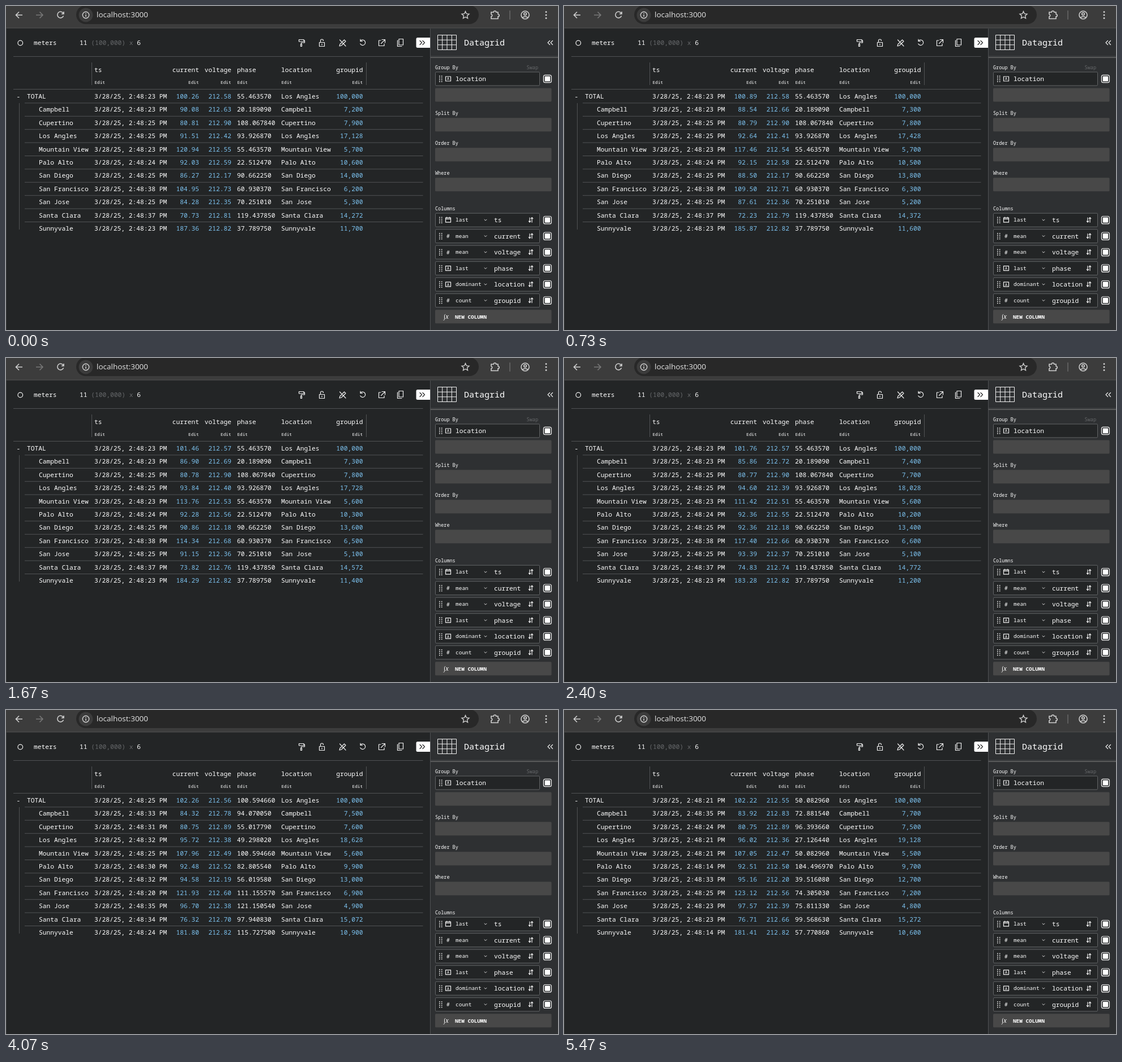
Animation of 975 by 574 pixels, one loop 5.54 s. Source, as an HTML page:

```html
<!DOCTYPE html>
<html lang="en">
<head>
<meta charset="utf-8">
<title>Streaming data grid</title>
<style>
html, body { margin: 0; width: 100%; height: 100%; overflow: hidden; background: #232526; }
svg { display: block; width: 975px; height: 574px; }
text { font-family: "Noto Sans Mono", "DejaVu Sans Mono", monospace; font-size: 11.25px; fill: #fff; white-space: pre; }
.num { fill: #7dc3f0; text-anchor: end; }
.end { text-anchor: end; }
.tiny { font-size: 7.7px; }
.label { font-size: 8.5px; font-weight: 500; }
.agg { font-size: 9.5px; font-weight: 500; }
.name { font-weight: 500; }
.dim { fill: #66686a; }
.url { font: 13.5px "Open Sans", "Noto Sans", sans-serif; fill: #e6e6e6; }
.ico { fill: none; stroke: #f0f0f0; stroke-width: 1.2; stroke-linecap: round; stroke-linejoin: round; }
.thin { stroke-width: .9; }
.bar { fill: none; stroke: #d0d0d0; stroke-width: 1.6; }
.rule { stroke: #505254; fill: none; }
.field { fill: #232526; stroke: #626466; }
.slot { fill: #484848; }
</style>
</head>
<body>
<svg viewBox="0 0 975 574">
  <!-- browser bar -->
  <rect width="975" height="39" fill="#3c3c3c"/>
  <rect x="124" y="-1" width="711" height="33" rx="16.5" fill="#282828"/>
  <path d="M0 39H975" stroke="#555"/>
  <circle cx="141" cy="16" r="12.5" fill="#3c3c3c"/>
  <g class="bar">
    <path d="M29 16H18M23 10.5 17.5 16 23 21.5"/>
    <path d="M53 16H64.5M59.5 10.5 65 16 59.5 21.5" stroke="#777"/>
    <path d="M101.2 13A5.5 5.5 0 1 0 101.5 17.5M102 10V14H98"/>
    <circle cx="141" cy="16" r="5.7" stroke-width="1.4"/>
    <path d="M141 15.2V19M141 12.5V14" stroke-width="1.5"/>
    <path d="M811.5 9.5 813.4 13.7 818 14.2 814.6 17.3 815.5 21.8 811.5 19.5 807.5 21.8 808.4 17.3 805 14.2 809.6 13.7Z" stroke-width="1.4"/>
    <path d="M857 11H861.3A2.2 2.2 0 0 1 865.7 11H869V14.5A2.2 2.2 0 0 1 869 18.9V22.5H857V18.8A2.2 2.2 0 0 0 857 14.5Z"/>
    <path d="M890 8V24" stroke="#666"/>
    <circle cx="917" cy="16" r="7"/>
    <circle cx="917" cy="14" r="2.3"/>
    <path d="M912 20.8Q917 16.7 922 20.8"/>
    <path d="M954 10.5h0M954 16h0M954 21.5h0" stroke-width="3" stroke-linecap="round"/>
  </g>
  <text class="url" x="160" y="20.3">localhost:3000</text>

  <!-- toolbar -->
  <path d="M.5 40V574" stroke="#393b3c"/>
  <circle class="ico" cx="25.3" cy="65.5" r="4.3"/>
  <text x="49" y="69">meters</text>
  <text x="130" y="69">11 <tspan class="dim">(100,000) x</tspan> 6</text>
  <g class="ico">
    <path d="M517.5 59.5H526V63H517.5ZM526 61H527.5V65H521.5V67M520.5 67.5H522.5V71.5H520.5Z"/>
    <path d="M553.5 64.5H562.5V71.5H553.5ZM555.5 64.5V61.5A2.5 2.5 0 0 1 560.5 61.5M558 67V69"/>
    <path d="M589.5 60 600 71M589 71 590 67.5 597.5 60 600 62.5 592.5 70Z"/>
    <path d="M626.2 62A4.7 4.7 0 1 1 625.8 67M626 59V62.5H629.5"/>
    <path d="M662 61H658.5V70.5H668V67M664 59.5H669.5V65M669 60 662.5 66.5"/>
    <path d="M694 58.5H701.5V69H694ZM692 61H691.5V71.5H699"/>
  </g>
  <path d="M749.5 56H727A2.5 2.5 0 0 0 724.5 58.5V71.5A2.5 2.5 0 0 0 727 74H749.5Z" fill="#fff"/>
  <path class="ico" d="M731 61.5 734.5 65 731 68.5M736 61.5 739.5 65 736 68.5" style="stroke:#222"/>
  <path class="rule" d="M13 89.5H736.5"/>

  <g id="grid"></g>

  <!-- settings panel -->
  <rect x="749.5" y="40" width="226" height="534" fill="#2e3032"/>
  <path d="M749.5 40V56M749.5 74V574" stroke="#505254"/>
  <path d="M750 89H975" stroke="#47494b"/>
  <path d="M750 91.3H975" stroke="#666" stroke-width="1.6"/>
  <path d="M762.5 51.5H795.5V77.5H762.5ZM762 60.2H796M762 68.8H796M770.7 51V78M779 51V78M787.3 51V78" fill="none" stroke="#f2f2f2"/>
  <text class="name" x="809" y="69.7" style="font-size:15px">Datagrid</text>
  <path class="ico" d="M960.5 61.5 957 65 960.5 68.5M965.5 61.5 962 65 965.5 68.5"/>
  <g id="panel"></g>
</svg>
<script>
const byId = id => document.getElementById(id);

function add(parent, tag, attrs, content = "") {
  const node = document.createElementNS("http://www.w3.org/2000/svg", tag);
  for (const key in attrs) node.setAttribute(key, attrs[key]);
  node.textContent = content;
  return parent.appendChild(node);
}
const label = (parent, x, y, content, cls = "") => add(parent, "text", { x, y, class: cls }, content);
const path = (parent, d, cls) => add(parent, "path", { d, class: cls });

// ---- settings panel ----
const panel = byId("panel");

function typeIcon(type, y) {
  if (type === "#") return label(panel, 778, y + 3.5, "#", "agg");
  path(panel, `M776.5 ${y - 4}h9v8h-9z`, "ico");
  if (type === "A") add(panel, "text", { x: 781, y: y + 2.3, "text-anchor": "middle", style: "font-size:6.5px" }, "A");
  else path(panel, `M776.5 ${y - 1.8}h9M778.5 ${y - 5}v1M783.5 ${y - 5}v1`, "ico");
}

function field(y, type) {
  add(panel, "rect", { x: 758.5, y: y - 12, width: 184, height: 24, rx: 1.5, class: "field" });
  for (let i = 0; i < 8; i++) {
    add(panel, "rect", { x: 765 + (i % 2) * 3.8, y: y - 5.5 + (i >> 1) * 3.2, width: 1.7, height: 1.6, fill: "#e6e6e6" });
  }
  typeIcon(type, y);
  add(panel, "rect", { x: 949.4, y: y - 6.7, width: 14, height: 13.4, rx: 3, class: "ico" });
  add(panel, "rect", { x: 951.7, y: y - 4.6, width: 9.4, height: 9.2, rx: 1.2, fill: "#fff" });
}
const slot = y => add(panel, "rect", { x: 758, y: y - 12, width: 205.5, height: 24, rx: 1.5, class: "slot" });

label(panel, 758, 112, "Group By", "label");
label(panel, 940, 112, "Swap", "label dim end");
field(129, "A");
label(panel, 794, 133, "location", "name");
slot(157.5);
["Split By", "Order By", "Where"].forEach((name, i) => {
  label(panel, 758, 193 + i * 53, name, "label");
  slot(210.3 + i * 53);
});
label(panel, 758, 361.5, "Columns", "label");
[["D", "last", "ts"], ["#", "mean", "current"], ["#", "mean", "voltage"],
 ["A", "last", "phase"], ["A", "dominant", "location"], ["#", "count", "groupid"]].forEach(([type, agg, name], i) => {
  const y = 379.2 + i * 28.5;
  field(y, type);
  label(panel, 794, y + 3, agg, "agg");
  path(panel, `M845 ${y - 1}l2 2 2 -2`, "ico thin");
  label(panel, 862, y + 4.2, name, "name");
  path(panel, `M925 ${y - 4}v8m-1.7 -2l1.7 2 1.7 -2M929 ${y + 4}v-8.500m-1.7 2l1.7 -2 1.7 2`, "ico");
});
slot(550.3);
add(panel, "text", { x: 773, y: 554, style: "font:italic 11px 'Noto Serif',serif" }, "∫x");
add(panel, "text", { x: 793, y: 553.7, style: "font-size:9.35px;font-weight:600" }, "NEW COLUMN");

// ---- table ----
// last second and phase, then from/to pairs: current, hundredths above 212 V, count
const cities = [
  ["Campbell", 23, 20.18909, [90.08, 83.92], [63, 83], [7200, 7660]],
  ["Cupertino", 25, 108.06784, [80.81, 80.75], [90, 89], [7900, 7456]],
  ["Los Angles", 25, 93.92687, [91.51, 96.02], [42, 36], [17128, 19084]],
  ["Mountain View", 23, 55.46357, [120.94, 107.05], [55, 47], [5700, 5500]],
  ["Palo Alto", 24, 22.51247, [92.03, 92.51], [59, 50], [10600, 9700]],
  ["San Diego", 25, 90.66225, [86.27, 95.16], [17, 20], [14000, 12700]],
  ["San Francisco", 38, 60.93037, [104.95, 123.12], [73, 56], [6200, 7200]],
  ["San Jose", 25, 70.25101, [84.28, 97.57], [35, 39], [5300, 4800]],
  ["Santa Clara", 37, 119.43785, [70.73, 76.71], [81, 66], [14272, 15300]],
  ["Sunnyvale", 23, 37.78975, [187.36, 181.41], [82, 82], [11700, 10600]]
];
const newest = 3; // the city that supplies the total row's last reading

const grid = byId("grid");
[["ts", 156], ["current", 341, 1], ["voltage", 398, 1], ["phase", 408], ["location", 486], ["groupid", 630.5, 1]]
  .forEach(([name, x, right]) => {
    label(grid, x, 117, name, right ? "end" : "");
    label(grid, right ? x - .5 : x + .5, 138.3, "Edit", right ? "tiny end" : "tiny");
  });
path(grid, "M151.5 100V140M636.5 100V140M13 147.5H736.5M23.5 172V396", "rule");
label(grid, 18.5, 164, "-");

const rows = ["TOTAL", ...cities.map(city => city[0])].map((name, i) => {
  const y = 164 + i * 23.4;
  if (i < cities.length) path(grid, `M33 ${y + 7.9}H736.5`, "rule");
  label(grid, i ? 58 : 37, y, name);
  label(grid, 486, y, i ? name : "Los Angles");
  return [
    label(grid, 156, y), label(grid, 408, y), label(grid, 341, y, "", "num"),
    label(grid, 398, y, "", "num"), label(grid, 630.5, y, "", "num")
  ];
});

// ---- playback: 15 ticks per second ----
const LOOP = 5540, LAST = 82;
const pauses = [[39, 42], [47, 50], [56, 60], [72, 75]];
const batches = [42, 75];

const mix = ([from, to], part) => from + (to - from) * part;
const easeOut = part => part * (2 - part);
function random(seed) {
  const x = Math.sin(seed * 127.1) * 43758.5453;
  return x - Math.floor(x);
}

function reading([, second, phase, current, volts, count], i, batch, part) {
  const seed = i * 9 + batch * 2;
  return {
    second: batch ? Math.floor(14 + random(seed) * 24) : second,
    phase: batch ? 20 + random(seed + 1) * 102 : phase,
    current: mix(current, easeOut(part)),
    voltage: 212 + mix(volts, part) / 100,
    count: count[0] + Math.round((mix(count, part) - count[0]) / 100) * 100
  };
}

function total(list) {
  const sum = list.reduce((all, item) => all + item.count, 0);
  const mean = key => list.reduce((all, item) => all + item[key] * item.count, 0) / sum;
  return { ...list[newest], current: mean("current"), voltage: mean("voltage"), count: 1e5 };
}

function draw(tick) {
  const pause = pauses.find(([from, to]) => tick > from && tick < to);
  if (pause) tick = pause[0];
  const batch = batches.filter(start => tick >= start).length;
  const list = cities.map((city, i) => reading(city, i, batch, tick / LAST));
  [total(list), ...list].forEach((item, i) => {
    const cells = [
      `3/28/25, 2:48:${item.second} PM`, item.phase.toFixed(5) + "0", item.current.toFixed(2),
      item.voltage.toFixed(2), item.count.toLocaleString("en-US")
    ];
    cells.forEach((cell, n) => rows[i][n].textContent = cell);
  });
}

let shown = -1;
function play() {
  const ms = performance.now() % LOOP;
  const tick = Math.min(LAST, Math.floor((ms + 5) * .015));
  if (tick !== shown) draw(shown = tick);
  requestAnimationFrame(play);
}
play();
</script>
</body>
</html>
```
